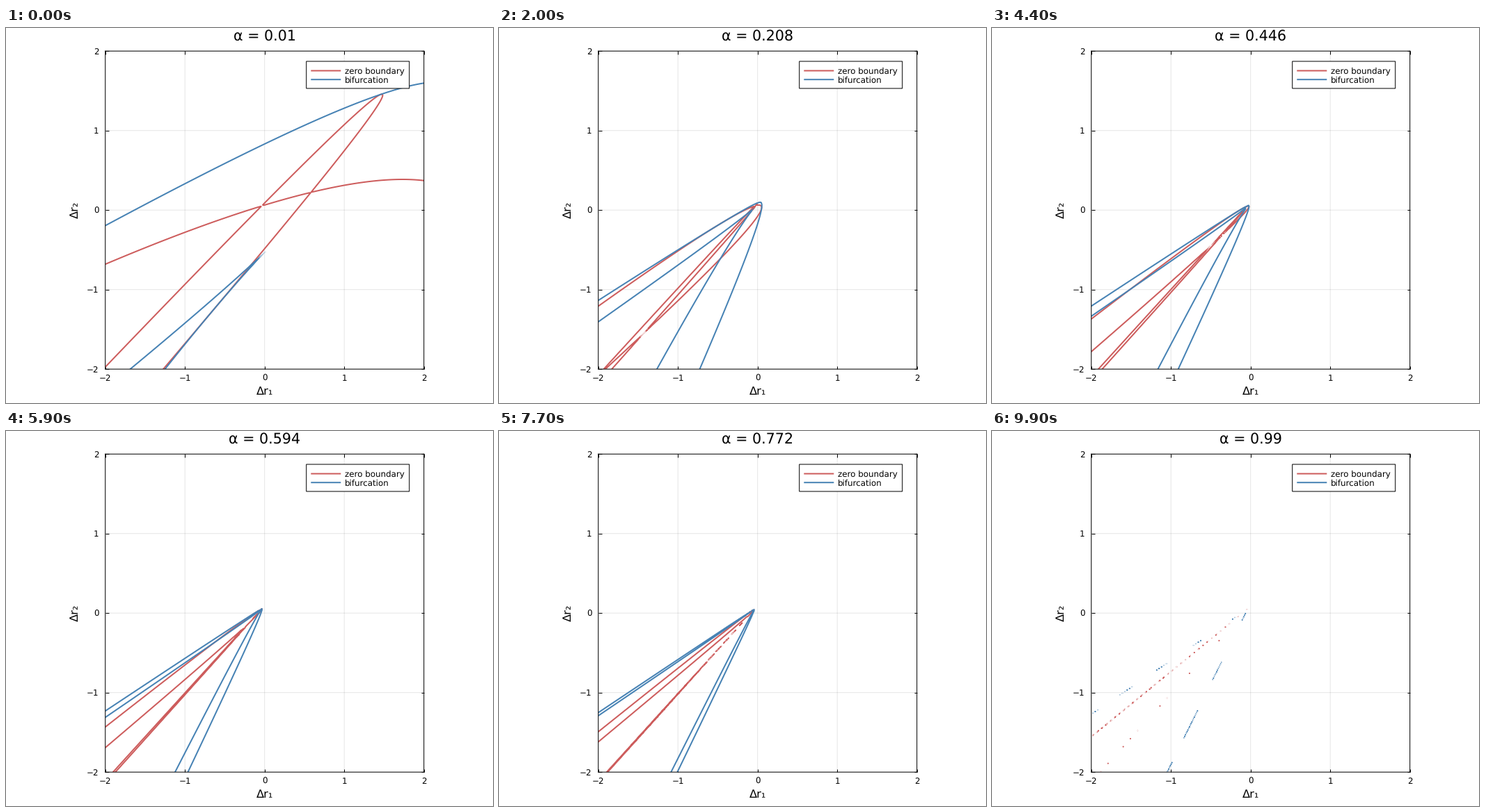
A matplotlib script for the animation above (10000 ms loop, 700x540 px).

```python
import numpy as np
import matplotlib.pyplot as plt
from matplotlib.animation import FuncAnimation
from matplotlib.patches import Rectangle

W, H, DPI = 700, 540, 100
PX = 72 / DPI  # points per pixel
FRAMES, INTERVAL = 100, 100
RED, BLUE = "indianred", "steelblue"
LEFT, TOP, SIDE = 142.7, 33.2, 458

plt.rcParams.update({"font.family": "DejaVu Sans", "text.hinting": "none"})

# Equilibria of a two-species model: dr = C + (1 - a) * linear - a * quadratic.
C = (-0.0376, 0.0514)
LINEAR = ((0.2491, 0.2522), (0.3439, 0.1057))
SQUARE = ((1, 1.1082), (1, 0.8182))
RAY1, RAY2 = 0.6741, 2.030  # slopes of the limiting fold rays

axis = np.linspace(-2, 2, 400)
gx, gy = np.meshgrid(axis, axis)
dx, dy = gx - C[0], gy - C[1]
r2 = (dy - RAY1 * dx) / (RAY2 - RAY1)
r1 = dx - r2


def cross(a, b):
    return a[0] * b[1] - a[1] * b[0]


def zero_boundary(k2):
    """Product of the two parabolas on which one species vanishes."""
    f = 1
    for u, w in zip(LINEAR, SQUARE):
        f = f * (cross((dx, dy), w) ** 2 - k2 * cross(u, w) * cross((dx, dy), u))
    return f


def bifurcation(k2):
    """Discriminant of the equilibrium equations, in the basis of the fold rays."""
    p, q = r1 - 0.017515 * k2, r2 + 0.000622 * k2
    m, n = 0.05215 * k2, 0.001623 * k2
    pq = p * q
    return 256 * (pq * pq + m * q * q * q + n * p * p * p) + 288 * m * n * pq - 27 * (m * n) ** 2


fig = plt.figure(figsize=(W / DPI, H / DPI), dpi=DPI, facecolor="white")
ax = fig.add_axes([LEFT / W, 1 - (TOP + SIDE) / H, SIDE / W, SIDE / H])
ax.set(xlim=(-2, 2), ylim=(-2, 2), xticks=range(-2, 3), yticks=range(-2, 3))
ax.set_axisbelow(True)
ax.grid(color="black", alpha=0.1, lw=PX)
ax.tick_params(direction="in", length=4.5 * PX, width=PX, top=True, right=True,
               labelbottom=False, labelleft=False)
for spine in ax.spines.values():
    spine.set(linewidth=PX, snap=False)
for line in [*ax.get_xgridlines(), *ax.get_ygridlines()]:
    line.set_snap(False)

# Overlay in pixel coordinates for text and legend.
top = fig.add_axes([0, 0, 1, 1])
top.set(xlim=(0, W), ylim=(H, 0))
top.axis("off")


def text(x, y, s, size, ha="center", **kw):
    return top.text(x, y, s, fontsize=size * PX, ha=ha, va="baseline", **kw)


SMALL, GUIDE, TITLE = 11.83, 16.27, 20.7
for v in range(-2, 3):
    name = str(v).replace("-", "\u2212")
    pos = SIDE / 4 * (v + 2)
    text(LEFT + pos, 507.8, name, SMALL)
    text(133.3, TOP + SIDE - pos + 4.4, name, SMALL, ha="right")
text(372, 528.3, "Δr₁", GUIDE)
text(103.5, 262, "Δr₂", GUIDE, rotation=90, rotation_mode="anchor")
title = text(372, 17.8, "", TITLE)

top.add_patch(Rectangle((431.7, 48), 148, 39, fc="white", ec="black", lw=PX,
                        zorder=1, snap=False))
for y, color, name in ((61.5, RED, "zero boundary"), (74.2, BLUE, "bifurcation")):
    top.plot([438.3, 481.3], [y, y], color=color, lw=2 * PX, solid_capstyle="butt",
             snap=False)
    text(487, y + 4.2, name, SMALL, ha="left")

curves = []


def update(i):
    while curves:
        curves.pop().remove()
    a = 0.01 + 0.98 * i / (FRAMES - 1)
    k2 = (1 - a) ** 2 / a
    for f, color in ((zero_boundary, RED), (bifurcation, BLUE)):
        curve = ax.contour(axis, axis, f(k2), levels=[0], colors=color,
                           linewidths=2 * PX, linestyles="solid")
        curve.set(capstyle="round", joinstyle="round")
        curves.append(curve)
    title.set_text(f"α = {round(a, 3)}")
    return [title]


anim = FuncAnimation(fig, update, frames=FRAMES, interval=INTERVAL, repeat=True,
                     repeat_delay=0, blit=False)
plt.show()
```
